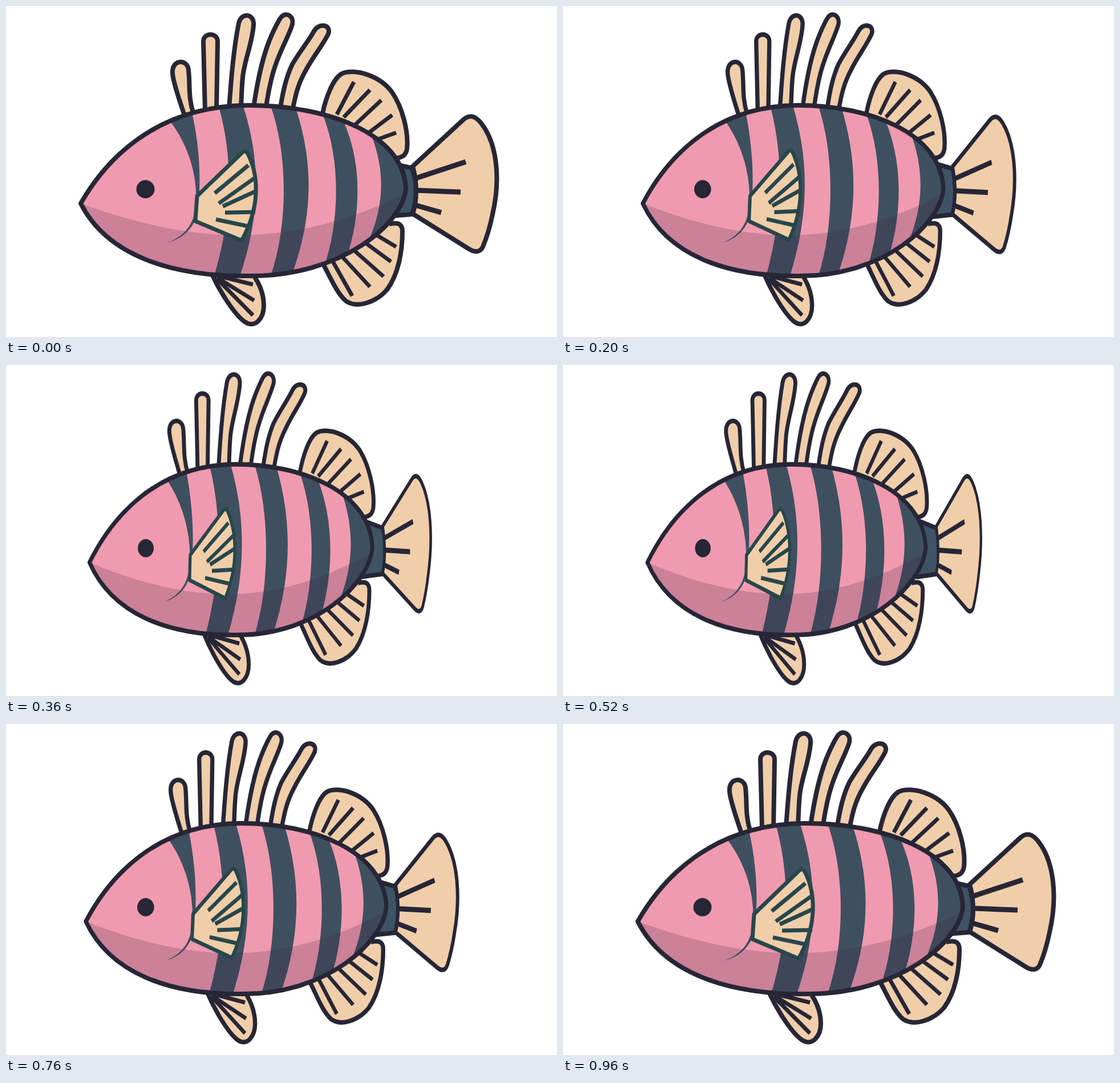
These frames come from a looping animation (966x580 px, 1000 ms). An HTML page:

```html
<!DOCTYPE html>
<html lang="en">
<head>
<meta charset="utf-8">
<title>Striped fish</title>
<style>
  html, body { margin: 0; width: 100%; height: 100%; overflow: hidden; background: #fff; }
  svg { display: block; width: 100%; height: 100%; }
  path { stroke-linejoin: round; }
  .fin { fill: #f0ceaa; stroke: #272636; stroke-width: 8; }
  .ray { fill: none; stroke: #272636; stroke-width: 7; }
  .stripe { fill: #3e5060; }
  #tail .ray { stroke-width: 9; }
  #pectoral path { stroke: #27464b; stroke-width: 7; }
</style>
</head>
<body>
<svg viewBox="0 0 966 580">
  <defs>
    <path id="shape" d="M131 346C171 276 257 175 425 174C560 174 697 222 701 320C696 382 588 473 430 473C290 475 177 437 131 346Z"/>
    <clipPath id="inside"><use href="#shape"/></clipPath>
  </defs>
  <g id="fish">
    <g id="tail">
      <path d="M648 270L712 284C721 310 721 340 712 365L648 370Z" fill="#3e5366" stroke="#272636" stroke-width="8"/>
      <path class="fin" d="M713 281L802 199C812 190 822 192 832 204C860 238 868 300 853 365C847 395 841 410 836 422C831 432 822 432 812 426L713 364C721 340 721 310 713 281Z"/>
      <path class="ray" d="M718 302L806 273M720 323L797 326M718 349L763 362"/>
    </g>

    <!-- spines -->
    <path class="fin" d="M313 192C306 170 293 135 292 118C290 93 318 92 320 112C323 140 319 160 329 190"/>
    <path class="fin" d="M349 186L346 62C346 46 371 46 371 62L369 184"/>
    <path class="fin" d="M391 180C394 140 398 80 408 30C413 10 436 13 434 34C431 68 418 95 415 125C413 145 413 160 412 178"/>
    <path class="fin" d="M434 178C441 130 450 85 467 48C475 31 480 21 484 18C493 10 505 19 502 32C497 50 482 75 472 105C464 128 460 150 456 177"/>
    <path class="fin" d="M481 178C486 148 491 125 502 102C516 78 530 62 540 44C549 28 571 33 565 49C554 71 540 86 526 112C512 136 508 155 503 179"/>

    <!-- back and belly fins -->
    <path class="fin" d="M555 188C561 160 573 128 588 119C610 108 655 122 676 150C695 177 706 220 703 250C701 265 690 266 678 268"/>
    <path class="ray" d="M610 133L580 190M638 147L592 195M658 165L612 208M677 191L632 225M684 222L642 237"/>
    <path class="fin" d="M556 452C570 478 580 503 596 517C615 530 648 520 668 497C688 470 695 430 695 395C695 380 685 379 672 382"/>
    <path class="ray" d="M572 446L607 508M590 440L638 492M610 428L662 474M630 415L675 448M644 398L684 422"/>
    <path class="fin" d="M362 472C375 500 400 540 418 553C438 567 452 545 452 525C452 505 446 490 436 475"/>
    <path class="ray" d="M368 472L433 488M370 476L435 516M370 478L433 542"/>

    <!-- body -->
    <use href="#shape" fill="#f09aaf"/>
    <g clip-path="url(#inside)">
      <path class="stripe" d="M372 172C400 270 396 370 364 476L409 476C446 370 448 270 414 170Z"/>
      <path class="stripe" d="M462 170C493 250 497 380 463 476L499 476C540 370 540 270 505 170Z"/>
      <path class="stripe" d="M551 180C587 260 587 375 556 462L597 442C624 360 624 270 589 196Z"/>
      <path class="stripe" d="M642 230C664 290 664 350 634 415L720 400V230Z"/>
      <path d="M131 346C330 418 500 428 703 327V480H131Z" fill="#422242" fill-opacity=".213"/>
      <path class="stripe" d="M286 200C318 240 336 295 333 345C332 376 318 402 282 415C320 405 338 378 338 340C342 290 337 235 326 186Z"/>
    </g>
    <use href="#shape" fill="none" stroke="#272636" stroke-width="8" stroke-linejoin="round"/>
    <circle cx="244.5" cy="321" r="16" fill="#272636"/>

    <g id="pectoral">
      <path class="fin" d="M335 333L415 256Q420 252 424 259C444 298 445 355 413 411L332 377Z"/>
      <path class="ray" d="M366 328L425 279M373 346L435 302M380 351L439 324M384 362L437 361M368 374L425 386"/>
    </g>
  </g>
</svg>
<script>
  const LOOP = 1000, STEP = 40, HALF = 480;
  const part = id => document.getElementById(id);
  const fish = part('fish'), tail = part('tail'), pectoral = part('pectoral');

  // linear start, soft stop at full squash, mirrored on the way back
  function squash(t) {
    const u = Math.max(0, 1 - Math.abs(t - HALF) / HALF);
    return u + u * u - u * u * u;
  }

  function scaleX(x, s) {
    return `translate(${x} 0) scale(${s} 1) translate(${-x} 0)`;
  }

  function draw(now) {
    const t = Math.floor((now % LOOP) / STEP) * STEP;
    const p = squash(t);
    fish.setAttribute('transform', scaleX(249, 1 - 0.146 * p));
    tail.setAttribute('transform', `translate(0 ${1.5 * p}) ` + scaleX(739, 1 - 0.386 * p));
    pectoral.setAttribute('transform', `rotate(${-2 * p} 334 362) ` + scaleX(334, 1 - 0.14 * p));
  }

  let start;
  function tick(now) {
    start ??= now;
    draw(now - start);
    requestAnimationFrame(tick);
  }
  draw(0);
  requestAnimationFrame(tick);
</script>
</body>
</html>
```
